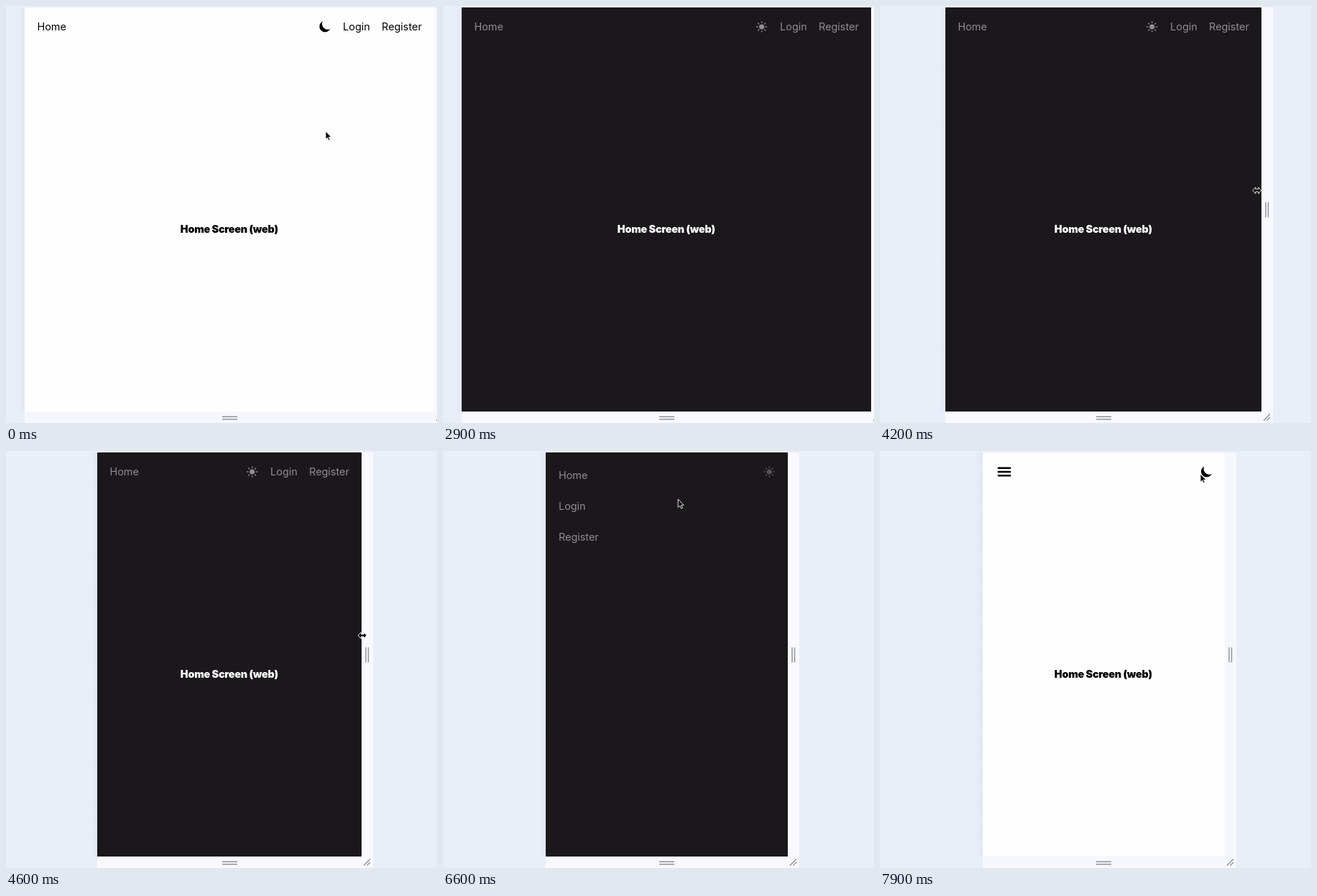
An HTML page that plays this animation: 600x581 px, repeating every 8000 ms.

```html
<!DOCTYPE html>
<html lang="en">
<head>
<meta charset="utf-8">
<title>Responsive home screen</title>
<style>
  html, body { margin: 0; width: 100%; height: 100%; overflow: hidden; background: #e9eef9; }
  svg { display: block; width: 600px; height: 581px; }
  text { font: 400 14.4px Inter, "Liberation Sans", sans-serif; fill: currentColor; }
  .title { font-weight: 900; letter-spacing: -.25px; text-anchor: middle; }
  .end { text-anchor: end; }
  .grip { stroke: #8f9196; stroke-width: 1.4; fill: none; }
</style>
</head>
<body>
<svg viewBox="0 0 600 581">
  <defs>
    <linearGradient id="shade">
      <stop offset="0" stop-color="#dce3f0" stop-opacity="0"/>
      <stop offset="1" stop-color="#dce3f0" stop-opacity=".6"/>
    </linearGradient>
    <clipPath id="pageClip"><rect id="clipRect" y="2" height="563"/></clipPath>
  </defs>
  <rect width="600" height="581" fill="#e9eef9"/>
  <rect id="shadow" y="2" width="10" height="563" fill="url(#shade)"/>
  <rect id="frame" y="2" height="579"/>
  <rect id="page" y="2" height="563"/>
  <path class="grip" d="M301 572.2h21M301 575.8h21"/>
  <g id="rightGrips" class="grip">
    <path d="M6 273.5v21M9.5 273.5v21"/>
    <path d="M3 577.5l9-9M7.5 577.5l4.5-4.5"/>
  </g>

  <g clip-path="url(#pageClip)">
    <g id="content">
      <text id="title" class="title" x="310.8" y="315.5">Home Screen (web)</text>
      <g id="wideLeft"><text x="17" y="34.3">Home</text></g>
      <g id="wideRight">
        <text class="end" x="-89.3" y="34.3">Login</text>
        <text class="end" x="-17.2" y="34.3">Register</text>
      </g>
      <path id="burger" d="M21.3 23.7h16.4M21.3 29h16.4M21.3 34.3h16.4"
            stroke="currentColor" stroke-width="2.4" stroke-linecap="round"/>
      <g id="sun">
        <circle r="3.6" fill="currentColor"/>
        <g id="rays" stroke="currentColor" stroke-width="1.4" stroke-linecap="round"></g>
      </g>
      <path id="moon" fill="currentColor" d="M-2.9-7.5A7.8 7.8 0 1 0 7.5 2.9A7.8 7.8 0 0 1-2.9-7.5Z"/>
    </g>
    <g id="drawer" color="#8f8d90">
      <rect y="2" width="255" height="563" fill="#1a181a"/>
      <text x="18" y="39">Home</text>
      <text x="18" y="82">Login</text>
      <text x="18" y="125">Register</text>
    </g>
  </g>

  <path id="arrow" d="M0 0V11.4L2.6 9 4.3 12.9 6.2 12.1 4.5 8.2H8Z"
        fill="#000" stroke="#fff" stroke-width=".9" stroke-linejoin="round"/>
  <g id="hand" stroke="#000" stroke-linejoin="round">
    <path d="M-1.4 .8Q0-1 1 .8L1.9 4Q3.3 2.6 4 4.1 5.5 3.2 5.9 4.7 7.4 4.3 7.6 5.6
      7.9 7.8 6.9 10L6.6 12.2H1.1Q0 10-2.9 7.4-3 5-.2 7.1Z" fill="#fff" stroke-width=".8"/>
    <path d="M2.3 8v2.4M4 8v2.4M5.6 8v2.4" stroke-width=".6"/>
  </g>
  <path id="resize" d="M-6 0L-2-4.4V-1.8H2V-4.4L6 0 2 4.4V1.8H-2V4.4Z"
        fill="#000" stroke="#fff" stroke-width=".9" stroke-linejoin="round"/>
</svg>
<script>
const LOOP = 8000, STEP = 100;
const WIDE_LEFT = 26.5, NARROW_LEFT = 143, EDGE_SUM = 622.6, BREAKPOINT = 360;
const el = {};
document.querySelectorAll('[id]').forEach(node => { el[node.id] = node; });

el.rays.innerHTML = Array.from({ length: 8 }, (_, i) =>
  `<path d="M0-5.6V-7" transform="rotate(${i * 45})"/>`).join('');

const progress = (t, from, to) => Math.min(1, Math.max(0, (t - from) / (to - from)));
const mix = (a, b, k) => a + (b - a) * k;
const smooth = k => k * k * (3 - 2 * k);
const easeOut = power => k => 1 - (1 - k) ** power;

// The pointer leads the window while dragging, so its ease is steeper.
const dragWindow = easeOut(1.7), dragPointer = easeOut(2.5), slide = easeOut(2);

const home = { x: 445, y: 174.5 };
const moves = [
  { from: 0, to: 100, x: 441, y: 174.5 },
  { from: 200, to: 700, x: 442.5, y: 33.2, rest: 'hand' },
  { from: 1600, to: 2600, x: 612, y: 280 },
  { from: 3300, to: 3700, x: 607, y: 257, moving: 'resize', rest: 'resize' },
  { from: 3700, to: 5000, x: 490, y: 257, moving: 'resize', rest: 'resize', ease: dragPointer },
  { from: 5100, to: 5600, x: 173, y: 32.4, rest: 'hand' },
  { from: 6300, to: 6800, x: 411, y: 86 },
  { from: 6900, to: 7500, x: 452.7, y: 23.5, rest: 'hand' },
  { from: 7800, to: 7900, x: 446, y: 32 },
];

function pointerAt(t) {
  let { x, y } = home, kind = 'arrow';
  for (const { from, to, ease = smooth, moving = 'arrow', rest = 'arrow', ...goal } of moves) {
    if (t <= from) break;
    const k = ease(progress(t, from, to));
    x = mix(x, goal.x, k);
    y = mix(y, goal.y, k);
    kind = t < to ? moving : rest;
  }
  return { x, y, kind };
}

const move = (node, x, y = 0) => node.setAttribute('transform', `translate(${x} ${y})`);
const show = (node, on) => node.setAttribute('display', on ? 'inline' : 'none');
const span = (node, x, width) => {
  node.setAttribute('x', x);
  node.setAttribute('width', width);
};

function drawPage(t, dark, open) {
  const edge = mix(WIDE_LEFT, NARROW_LEFT, dragWindow(progress(t, 3700, 5000)));
  const left = Math.floor(edge), right = Math.round(EDGE_SUM - edge);
  const width = right - left, narrow = width < BREAKPOINT;

  span(el.page, left, width);
  span(el.clipRect, left, width);
  span(el.frame, left, width + 16);
  span(el.shadow, left - 10, 10);
  el.page.setAttribute('fill', dark ? '#1a181a' : '#fefdff');
  el.frame.setAttribute('fill', dark ? '#f8f8fe' : '#f5f7fd');
  el.content.setAttribute('color', dark ? '#8f8d90' : '#000');
  el.content.setAttribute('opacity', 1 - open / 2);
  el.title.style.fill = dark ? '#fff' : '#000';

  const iconX = right - (narrow ? 25.7 : 152.3);
  for (const node of [el.wideLeft, el.burger]) move(node, left + .5);
  for (const node of [el.wideRight, el.rightGrips]) move(node, right);
  for (const node of [el.sun, el.moon]) move(node, iconX, 29);
  for (const node of [el.wideLeft, el.wideRight]) show(node, !narrow);
  show(el.burger, narrow);
  show(el.sun, dark);
  show(el.moon, !dark);

  move(el.drawer, left - 255 * (1 - open));
  show(el.drawer, open > 0);
}

function drawPointer(t, open) {
  const { x, y, kind } = pointerAt(t);
  const shown = kind === 'hand' && open > .5 ? 'arrow' : kind;
  for (const name of ['arrow', 'hand', 'resize']) {
    show(el[name], name === shown);
    move(el[name], x, y);
  }
}

function draw(time) {
  const t = Math.floor(time / STEP) * STEP;
  const dark = t >= 900 && t < 7700;
  const open = slide(progress(t, 5700, 6100)) - slide(progress(t, 6900, 7300));
  drawPage(t, dark, open);
  drawPointer(t, open);
}

const start = performance.now();
function tick(now) {
  draw(Math.max(0, now - start) % LOOP);
  requestAnimationFrame(tick);
}
draw(0);
requestAnimationFrame(tick);
</script>
</body>
</html>
```
